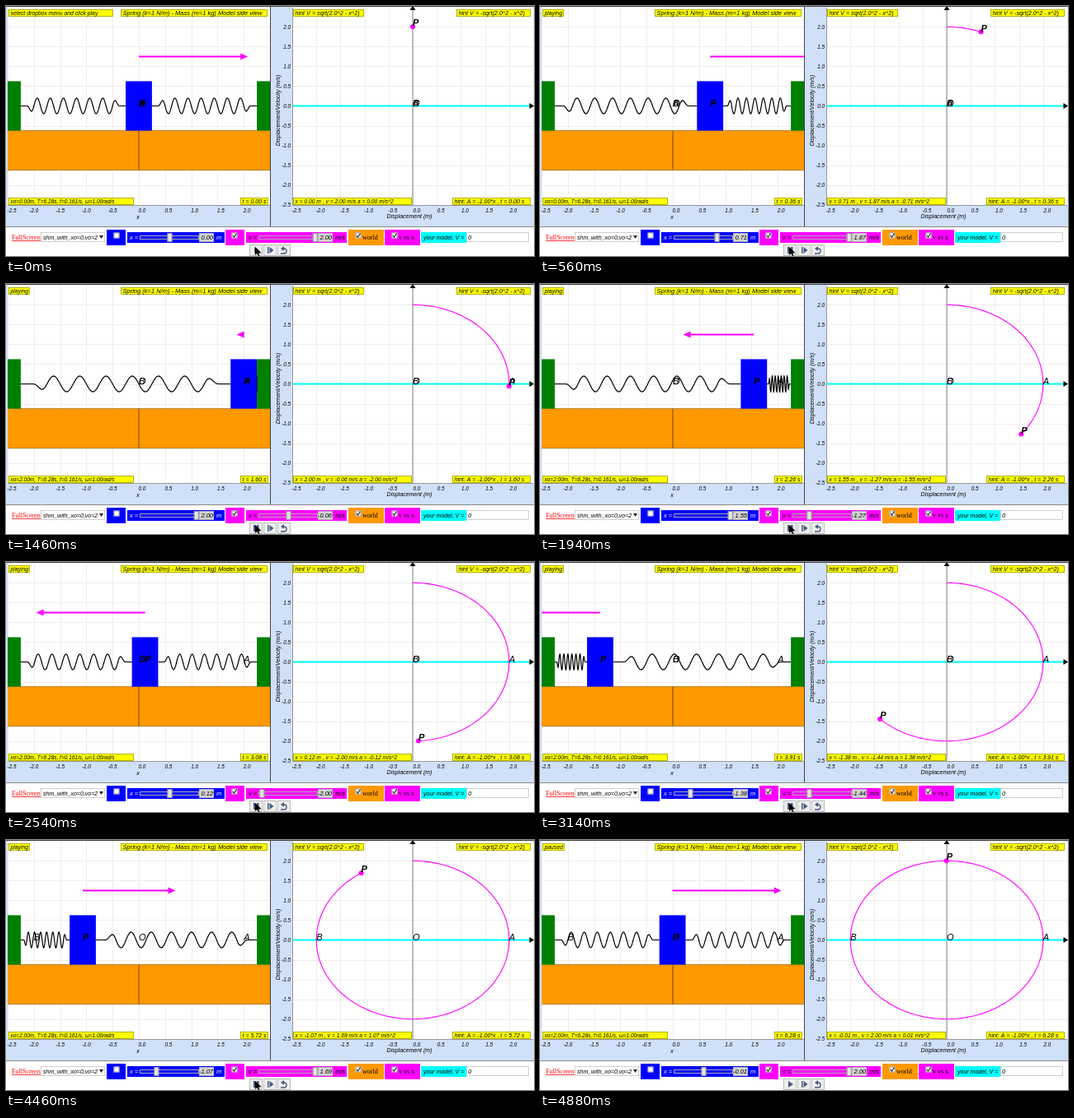
An HTML page with a canvas for the animation above (4940 ms loop, 640 px wide and 304 px high).

```html
<!DOCTYPE html>
<html lang="en">
<head>
<meta charset="utf-8">
<title>Spring and mass</title>
<style>
html, body { margin: 0; height: 100%; overflow: hidden; background: #fff; }
canvas { display: block; }
</style>
</head>
<body>
<canvas id="stage" width="640" height="304"></canvas>
<script>
const ctx = document.getElementById('stage').getContext('2d');
const LOOP = 4940, STEP = 60, PERIOD = 6.28, AMP = 2;
const BLUE = '#0000ff', MAGENTA = '#ff00ff', ORANGE = '#ff9900', YELLOW = '#ffff00';
const MARGIN = '#d0e0f8', CYAN = '#00ffff', SANS = '"Liberation Sans", sans-serif';
const MID = 121.5, UNIT_X = 63.6, UNIT_Y = 48.1;
const sideX = x => 161 + UNIT_X * x;
const graphX = x => 493 + 58.4 * x;
const graphY = v => MID - UNIT_Y * v;

function rect(x, y, w, h, fill, stroke) {
  if (fill) { ctx.fillStyle = fill; ctx.fillRect(x, y, w, h); }
  if (stroke) {
    ctx.strokeStyle = stroke;
    ctx.lineWidth = 0.7;
    ctx.strokeRect(x + 0.5, y + 0.5, w - 1, h - 1);
  }
}

function path(points, color, width = 1) {
  ctx.beginPath();
  points.forEach(([x, y]) => ctx.lineTo(x, y));
  ctx.strokeStyle = color;
  ctx.lineWidth = width;
  ctx.stroke();
}

function poly(points, color) {
  ctx.beginPath();
  points.forEach(([x, y]) => ctx.lineTo(x, y));
  ctx.fillStyle = color;
  ctx.fill();
}

function text(str, x, y, size = 7, { color = '#000', align = 'left', font = SANS, style = 'italic' } = {}) {
  ctx.font = `${style} ${size}px ${font}`;
  ctx.textAlign = align;
  ctx.fillStyle = color;
  ctx.fillText(str, x, y);
}

// Without a width the box follows its text.
function note(str, x, y, size, w) {
  ctx.font = `italic ${size}px ${SANS}`;
  rect(x, y, w || ctx.measureText(str).width * 1.2, 9, YELLOW, '#909000');
  text(str, x + 2.5, y + 7, size);
}

function clipped(x, w, draw) {
  ctx.save();
  ctx.beginPath();
  ctx.rect(x, 2, w, 240);
  ctx.clip();
  draw();
  ctx.restore();
}

function grid(x0, w, toX) {
  rect(x0, 2, w, 240, '#fff');
  for (let n = -5; n <= 5; n++) {
    const x = Math.round(toX(n / 2)) + 0.5, y = Math.round(graphY(n / 2)) + 0.5;
    path([[x, 2], [x, 242]], '#f2ecec');
    path([[x0, y], [x0 + w, y]], '#f2ecec');
  }
}

// Flat half loop at each end, then a half loop in which the coils grow.
function spring(from, to, sign) {
  const loops = 8, perLoop = 15, total = loops * perLoop, half = 7;
  const points = [];
  for (let i = 0; i <= total; i++) {
    const grow = Math.max(0, Math.min(1, (Math.min(i, total - i) - half) / half));
    points.push([from + (to - from) * i / total, MID - sign * 9.6 * grow * Math.sin(2 * Math.PI * i / perLoop)]);
  }
  path(points, '#000', 1.2);
}

function velocityArrow(x, v) {
  const dir = Math.sign(v), tip = sideX(x + v) + 5 * dir;
  path([[sideX(x), 61.5], [tip - 7 * dir, 61.5]], MAGENTA, 2);
  poly([[tip, 61.5], [tip - 9 * dir, 57.5], [tip - 9 * dir, 65.5]], MAGENTA);
}

function marks(toX, s) {
  text('O', toX(0), MID, 11);
  text('A', toX(s.t >= Math.PI / 2 ? AMP : 0), MID, 11);
  text('B', toX(s.t >= 1.5 * Math.PI ? -AMP : 0), MID, 11);
}

function sideView(s) {
  const top = graphY(0.625), floor = graphY(-0.625), half = UNIT_X / 4;
  const x = sideX(s.x);
  grid(2, 318, sideX);
  clipped(2, 318, () => {
    rect(2, floor, 318, UNIT_Y, ORANGE);
    path([[2, floor], [320, floor]], '#996000', 0.7);
    path([[2, floor + UNIT_Y], [320, floor + UNIT_Y]], '#996000', 0.7);
    path([[161, floor], [161, floor + UNIT_Y]], '#553300', 0.8);
    rect(2, top, half, floor - top, '#008000');
    rect(320 - half, top, half, floor - top, '#008000');
    spring(2 + half, x - half, 1);
    spring(x + half, 320 - half, -1);
    rect(x - half, top, 2 * half, floor - top, BLUE);
    velocityArrow(s.x, s.v);
    marks(sideX, s);
    text('P', x, MID, 11, { style: 'italic bold' });
  });
  note(s.status, 3, 4, 6.8);
  note('Spring (k=1 N/m) - Mass (m=1 kg) Model side view', 139, 4, 7.5, 178);
  const start = s.t >= Math.PI / 2 ? '2.00' : '0.00';
  note(`xo=${start}m, T=6.28s, f=0.161/s, ω=1.00rad/s`, 3, 233, 6.5, 152);
  note(`t = ${s.t.toFixed(2)} s`, 284, 233, 7, 34);
  for (let n = -5; n < 5; n++) {
    const shift = n === -5 ? 5 : n < 0 ? 0 : 4;
    text((n / 2).toFixed(1), sideX(n / 2) + shift, 251, 6.3, { align: 'center' });
  }
  text('x', 160, 259, 7, { align: 'center' });
}

function graph(s) {
  grid(347, 292, graphX);
  for (let n = -5; n < 5; n++) {
    const label = (n / 2).toFixed(1);
    text(label, 345, graphY(n / 2) + 2.5, 6.3, { align: 'right' });
    text(label, graphX(n / 2) + 5, 251, 6.3, { align: 'center' });
  }
  text('Displacement (m)', 489, 258, 7, { align: 'center' });
  ctx.save();
  ctx.translate(332, 127);
  ctx.rotate(-Math.PI / 2);
  text('Displacement/Velocity (m/s)', 0, 0, 7, { align: 'center' });
  ctx.restore();

  path([[493, 2], [493, 242]], '#666', 0.8);
  path([[347, MID], [639, MID]], CYAN, 2);
  poly([[640, MID], [634.5, MID - 3.5], [634.5, MID + 3.5]], '#000');
  poly([[493, 0], [489.5, 5], [496.5, 5]], '#000');

  const count = Math.ceil(s.t * 30) + 1;
  const trail = Array.from({ length: count + 1 }, (_, i) => {
    const a = s.t * i / count;
    return [graphX(AMP * Math.sin(a)), graphY(AMP * Math.cos(a))];
  });
  path(trail, MAGENTA, 1.1);
  ctx.beginPath();
  ctx.arc(graphX(s.x), graphY(s.v), 3, 0, 2 * Math.PI);
  ctx.fillStyle = MAGENTA;
  ctx.fill();
  marks(graphX, s);
  text('P', graphX(s.x), graphY(s.v) - 1, 11, { style: 'italic bold' });

  note('hint V = sqrt(2.0^2 - x^2)', 348, 4, 7.2, 86);
  note('hint V = -sqrt(2.0^2 - x^2)', 546, 4, 7.2, 90);
  const [x, v, a] = [s.x, s.v, -s.x].map(n => n.toFixed(2));
  note(`x = ${x} m , v = ${v} m/s a = ${a} m/s^2`, 348, 233, 6.7, 144);
  note(`hint: A = -1.00*x , t = ${s.t.toFixed(2)} s`, 541, 233, 7, 95);
}

function checkbox(x, checked) {
  rect(x - 3.5, 275.5, 7, 7, '#fff', '#777');
  if (checked) path([[x - 2, 279], [x - 0.5, 281], [x + 2.5, 276.5]], '#222', 1.2);
}

function slider(x, value, color, name, unit, ink, width) {
  rect(x, 275, width, 13, color);
  text(`${name} =`, x + 3, 284, 7.5, { color: ink });
  rect(x + 15, 279, 72, 5, '#fff', '#888');
  rect(x + 16, 280, 70, 3, color);
  const thumb = x + 51 + 16.1 * Math.round(value);
  rect(thumb - 2.5, 276, 6, 11, '#e6e6e6', '#777');
  rect(x + 87, 276, 18, 11, '#d3d3d3', '#aaa');
  text(value.toFixed(2), x + 104, 284, 7.5, { align: 'right' });
  text(unit, x + 108, 284, 7.5, { color: ink });
}

function button(x) {
  rect(x, 290, 16, 14, '#eeeeee', '#a8a8a8');
}

function controls(s) {
  const serif = { font: '"Liberation Serif", serif', style: 'normal' };
  text('FullScreen', 7, 284, 8, { ...serif, color: '#ff0000' });
  rect(7, 285, 35, 0.8, '#ff0000');
  rect(42, 275, 78, 12, '#fff', '#bbb');
  text('shm_with_xo=0,vo=2', 45, 283.5, 7);
  poly([[113, 279], [118, 279], [115.5, 283]], '#222');

  rect(122, 272, 23, 19, BLUE);
  checkbox(134, false);
  slider(147, s.x, BLUE, 'x', 'm', '#fff', 118);
  rect(266, 272, 23, 19, MAGENTA);
  checkbox(277, true);
  slider(291, s.v, MAGENTA, 'v', 'm/s', '#000', 122);
  rect(415, 272, 43, 19, ORANGE);
  checkbox(427, true);
  text('world', 432, 284, 8, serif);
  rect(459, 272, 43, 19, MAGENTA);
  checkbox(471, true);
  text('v vs x', 476, 284, 8, serif);
  rect(503, 275, 55, 13, CYAN);
  text('your model, V =', 506, 284, 7);
  rect(558, 275, 76, 12, '#fff', '#bbb');
  text('0', 560, 284, 7.5);

  const icon = '#465a82';
  [295, 312, 329].forEach(button);
  if (s.status === 'playing') {
    rect(300, 293, 2.5, 8, icon);
    rect(304, 293, 2.5, 8, icon);
  } else {
    poly([[301, 293], [301, 301], [307, 297]], icon);
  }
  rect(317, 293, 1.5, 8, icon);
  poly([[319.5, 293], [319.5, 301], [324.5, 297]], icon);
  ctx.beginPath();
  ctx.arc(337, 298, 3, -Math.PI / 2, Math.PI / 2);
  ctx.lineTo(333, 301);
  ctx.strokeStyle = icon;
  ctx.lineWidth = 1.3;
  ctx.stroke();
  poly([[333, 295], [337, 292], [337, 298]], icon);
  if (s.status !== 'paused') {
    poly([[302, 293], [302, 303], [304.3, 301], [306, 304], [307.5, 303.5], [306, 300.5], [309.5, 300.3]], '#000');
  }
}

function stateAt(ms) {
  const tick = Math.floor((ms - 20) / STEP) * STEP + 20;
  const t = Math.max(0, Math.min(PERIOD, 0.94 + (tick - 980) / STEP * 0.0824));
  const status = ms < STEP ? 'select dropbox menu and click play' : t < PERIOD ? 'playing' : 'paused';
  return { t, status, x: AMP * Math.sin(t), v: AMP * Math.cos(t) };
}

function draw() {
  const s = stateAt(performance.now() % LOOP);
  rect(0, 0, 640, 304, '#fff');
  rect(0, 0, 640, 268, MARGIN);
  sideView(s);
  graph(s);
  path([[320.5, 0], [320.5, 268]], '#444');
  path([[0, 0.5], [640, 0.5]], '#444');
  path([[0, 268.5], [640, 268.5]], '#888');
  path([[2, 242.5], [320, 242.5]], '#999');
  path([[347.5, 2], [347.5, 242.5], [639, 242.5]], '#999');
  controls(s);
  requestAnimationFrame(draw);
}
draw();
</script>
</body>
</html>
```
